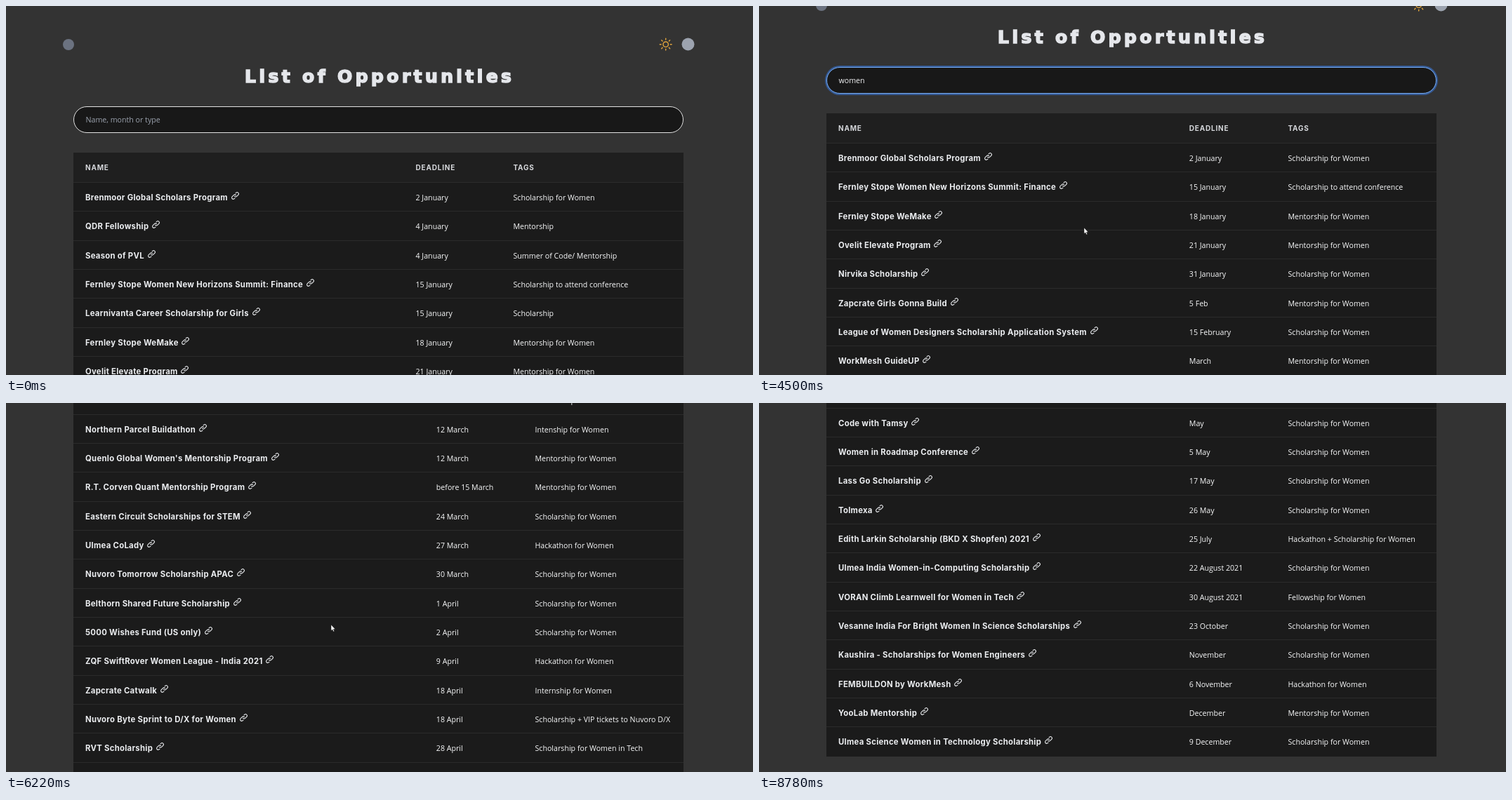
These frames come from a looping animation (1064x526 px, 9.45 s). An HTML page:

```html
<!DOCTYPE html>
<html lang="en">
<head>
<meta charset="utf-8">
<title>List of Opportunities</title>
<style>
  html, body { margin: 0; width: 100%; height: 100%; overflow: hidden; background: #333; }
  #stage { position: relative; width: 1064px; height: 526px; overflow: hidden; background: #333; }
  #page { position: absolute; left: 0; top: 0; width: 1064px; height: 1597px; will-change: transform;
    color: #f9fafb; font: 10.65px "Open Sans", "Noto Sans", sans-serif; }
  #icons, #cursor { position: absolute; left: 0; top: 0; overflow: visible; }
  h1 { position: absolute; left: 0; top: 81px; width: 1060px; margin: 0; text-align: center;
    padding-left: 4.4px; box-sizing: border-box; color: #e5e7eb; white-space: nowrap;
    font: 700 25px/40px "DejaVu Sans", sans-serif; letter-spacing: 4.4px; -webkit-text-stroke: 1.6px #e5e7eb; }
  #search { position: absolute; left: 96px; top: 143px; width: 868.5px; height: 38px; box-sizing: border-box;
    border: 1px solid #e2e2e2; border-radius: 19px; background: #181818; padding-left: 16.5px;
    line-height: 37px; white-space: pre; color: #9ca3af; }
  .focus #search { border-color: #78aef5; box-shadow: 0 0 0 2px rgba(59, 130, 246, .5); }
  .typed #search { color: #f3f4f6; }
  #caret { display: inline-block; width: 1px; height: 14px; margin-right: -1px; vertical-align: -3px; background: #fff; }
  #table { position: absolute; left: 96px; top: 209px; width: 868.5px; background: #1b1b1b; --due: 487.5px; --tags: 626.5px; }
  .typed #table { --due: 516.8px; --tags: 657.5px; }
  .row { position: relative; height: 41.33px; line-height: 43px; box-sizing: border-box;
    border-bottom: 1px solid #2b2b2b; white-space: nowrap; }
  .row:last-child { border: 0; }
  .row > * { position: absolute; top: 0; left: 17px; }
  .row > :nth-child(2) { left: var(--due); }
  .row > :nth-child(3) { left: var(--tags); }
  .row b { font: 700 11.3px/43px Inter, "Open Sans", sans-serif; letter-spacing: .3px; color: #eceef1; }
  .row svg { width: 13px; height: 13px; margin-left: 3.7px; vertical-align: 0; }
  .head { height: 43px; background: #1f1f1f; color: #d6d8dc;
    font: 700 10px/43px Inter, "Open Sans", sans-serif; letter-spacing: .8px; }
</style>
</head>
<body>
<div id="stage">
  <div id="page">
    <svg id="icons" width="1064" height="80">
      <circle cx="89" cy="55" r="8" fill="#6b7280"/>
      <circle cx="971.5" cy="54.5" r="9" fill="#9ca3af"/>
      <g id="sun" transform="translate(939.7 54.7)" fill="none" stroke="#e3a63d" stroke-width="1.4" stroke-linecap="round">
        <circle r="3.7"/>
      </g>
    </svg>
    <h1>List of Opportunities</h1>
    <div id="search"><span id="query"></span><i id="caret"></i><span id="hint">Name, month or type</span></div>
    <div id="table"><div class="row head"><span>NAME</span><span>DEADLINE</span><span>TAGS</span></div></div>
  </div>
  <svg id="cursor" width="1" height="1">
    <path id="arrow" d="M0 0V8.6L1.9 6.9 3.3 9.9 4.7 9.3 3.4 6.4H6Z" fill="#fff" stroke="#111" stroke-width=".5"/>
    <path id="beam" d="M-2.5 -6H-.5L0 -5.5.5 -6H2.5M0 -5.5V5.5M-2.5 6H-.5L0 5.5.5 6H2.5" fill="none" stroke="#e8e8e8"/>
  </svg>
</div>
<script>
const $ = id => document.getElementById(id);
const LOOP = 9450, FOCUS = 1490, TYPE = 2040, KEY = 130, WORD = "women";
const SW = "Scholarship for Women", MW = "Mentorship for Women", HW = "Hackathon for Women";

// name | deadline | tags
const entries = `Brenmoor Global Scholars Program|2 January|${SW}
QDR Fellowship|4 January|Mentorship
Season of PVL|4 January|Summer of Code/ Mentorship
Fernley Stope Women New Horizons Summit: Finance|15 January|Scholarship to attend conference
Learnivanta Career Scholarship for Girls|15 January|Scholarship
Fernley Stope WeMake|18 January|${MW}
Ovelit Elevate Program|21 January|${MW}
Nirvika Scholarship|31 January|${SW}
Zapcrate Girls Gonna Build|5 Feb|${MW}
League of Women Designers Scholarship Application System|15 February|${SW}
WorkMesh GuideUP|March|${MW}
Northern Parcel Buildathon|12 March|Intenship for Women
Quenlo Global Women's Mentorship Program|12 March|${MW}
R.T. Corven Quant Mentorship Program|before 15 March|${MW}
Eastern Circuit Scholarships for STEM|24 March|${SW}
Ulmea CoLady|27 March|${HW}
Nuvoro Tomorrow Scholarship APAC|30 March|${SW}
Belthorn Shared Future Scholarship|1 April|${SW}
5000 Wishes Fund (US only)|2 April|${SW}
ZQF SwiftRover Women League - India 2021|9 April|${HW}
Zapcrate Catwalk|18 April|Internship for Women
Nuvoro Byte Sprint to D/X for Women|18 April|Scholarship + VIP tickets to Nuvoro D/X
RVT Scholarship|28 April|${SW} in Tech
Code with Tamsy|May|${SW}
Women in Roadmap Conference|5 May|${SW}
Lass Go Scholarship|17 May|${SW}
Tolmexa|26 May|${SW}
Edith Larkin Scholarship (BKD X Shopfen) 2021|25 July|Hackathon + ${SW}
Ulmea India Women-in-Computing Scholarship|22 August 2021|${SW}
VORAN Climb Learnwell for Women in Tech|30 August 2021|Fellowship for Women
Vesanne India For Bright Women In Science Scholarships|23 October|${SW}
Kaushira - Scholarships for Women Engineers|November|${SW}
FEMBUILDON by WorkMesh|6 November|${HW}
YooLab Mentorship|December|${MW}
Ulmea Science Women in Technology Scholarship|9 December|${SW}`.split("\n");

const link = `<svg viewBox="0 0 24 24" fill="none" stroke="#eceef1" stroke-width="2" stroke-linecap="round"><path d="M13.83 10.17a4 4 0 0 0-5.66 0l-4 4a4 4 0 1 0 5.66 5.66l1.1-1.1m-.76-4.9a4 4 0 0 0 5.66 0l4-4a4 4 0 0 0-5.66-5.66l-1.1 1.1"/></svg>`;

const rows = entries.map(entry => {
  const [name, due, tags] = entry.split("|");
  const el = document.createElement("div");
  el.className = "row";
  el.innerHTML = `<b>${name}${link}</b><span>${due}</span><span>${tags}</span>`;
  $("table").append(el);
  return { el, text: entry.toLowerCase() };
});

for (let i = 0; i < 8; i++)
  $("sun").insertAdjacentHTML("beforeend", `<path d="M0 -6.6V-8.4" transform="rotate(${i * 45})"/>`);

// Scroll offsets by screen refresh, counted from the first wheel turn
const TICK = 68.7, WHEEL = 4150;
const stops = [[-1, 0], [5, 56], [9, 111], [12, 111], [17, 241], [30, 566], [41, 761], [48, 1071]];

function scrollAt(t) {
  const k = Math.floor((t - WHEEL) / TICK);
  if (k < 0) return 0;
  const i = stops.findIndex(s => s[0] > k);
  if (i < 0) return stops[stops.length - 1][1];
  const [k0, y0] = stops[i - 1], [k1, y1] = stops[i];
  return Math.round(y0 + (y1 - y0) * (k - k0) / (k1 - k0));
}

// Pointer positions: time, x, y
const path = [[260, 967, 501], [330, 815, 405], [400, 720, 338]];
for (let i = 1; i <= 9; i++) {
  const rest = (1 - i / 9) ** 2;
  path.push([590 + 70 * i, 482 + 238 * rest, 169 + 169 * rest]);
}
path.push([1690, 471, 174], [3280, 475, 178], [3350, 466, 240], [3420, 463, 316],
  [8190, 700, 385], [8260, 940, 470], [8320, 1031, 503], [8650, 1031, 509], [8720, 1031, 519], [8780, 1031, 540]);

function drawCursor(t) {
  const spot = path.filter(p => p[0] <= t).pop();
  $("cursor").style.display = spot ? "" : "none";
  if (!spot) return;
  const [, x, y] = spot, inField = y < 181;
  $("cursor").style.transform = `translate(${Math.round(x)}px, ${Math.round(y)}px)`;
  $("arrow").style.display = inField ? "none" : "";
  $("beam").style.display = inField ? "" : "none";
}

let shown = null;
function drawSearch(t) {
  const count = t < TYPE ? 0 : Math.min(WORD.length, Math.floor((t - TYPE) / KEY) + 1);
  const query = WORD.slice(0, count), focus = t >= FOCUS;
  const since = t - (count ? TYPE + (count - 1) * KEY : FOCUS);
  const lit = focus && Math.floor(since / 520) % 2 === 0;
  $("caret").style.visibility = lit ? "visible" : "hidden";
  $("page").classList.toggle("focus", focus);
  if (query === shown) return;
  shown = query;
  $("page").classList.toggle("typed", count > 0);
  $("query").textContent = query;
  $("hint").style.display = count ? "none" : "";
  for (const { el, text } of rows) el.style.display = text.includes(query) ? "" : "none";
}

const start = performance.now();
function draw() {
  const t = (performance.now() - start) % LOOP;
  drawSearch(t);
  drawCursor(t);
  $("page").style.transform = `translateY(${-scrollAt(t)}px)`;
  requestAnimationFrame(draw);
}
draw();
</script>
</body>
</html>
```
